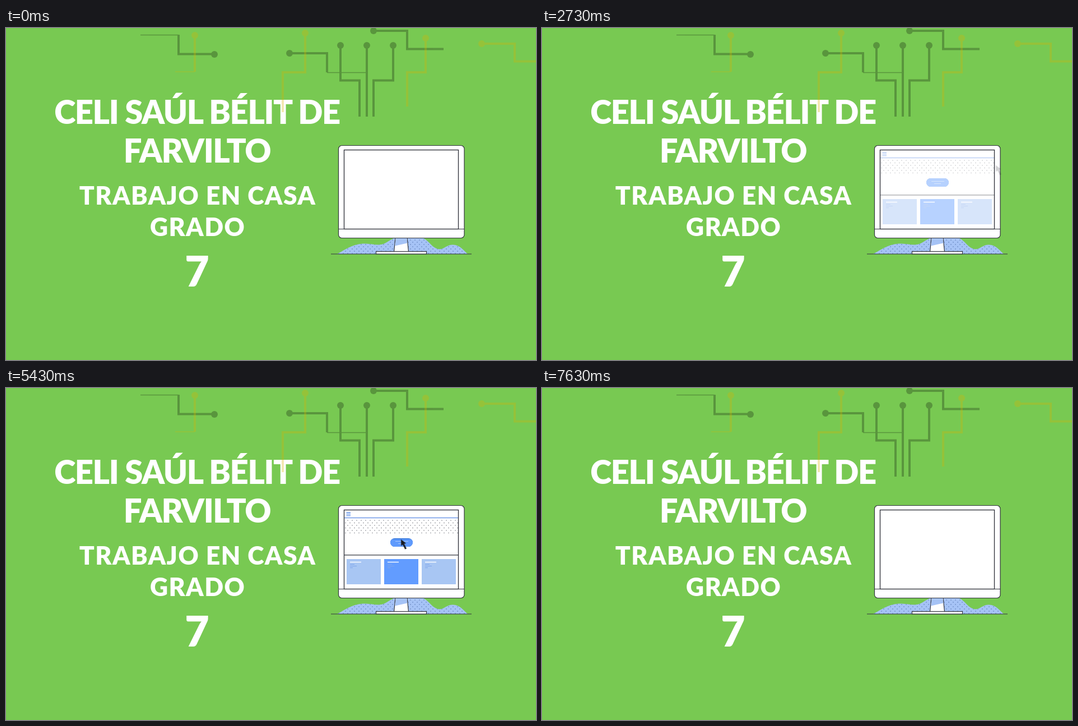
An HTML page without scripts that plays this animation: 946 by 592 pixels, repeating every 7660 ms.

```html
<!DOCTYPE html>
<html lang="es">
<head>
<meta charset="utf-8">
<title>Trabajo en casa</title>
<style>
  html, body { margin: 0; width: 100%; height: 100%; overflow: hidden; background: #78c952; }
  svg { display: block; width: 946px; height: 592px; }
  .title { fill: #fff; font-family: Lato, "Open Sans", sans-serif; font-weight: 900; text-anchor: middle; }
  .big { font-size: 58px; letter-spacing: -1.4px; }
  .mid { font-size: 44.5px; letter-spacing: 1.4px; }
  .num { font-size: 75px; }

  .wire { fill: none; stroke-width: 4; }
  .wire .thin { stroke-width: 1.6; }
  .dark { stroke: #000; opacity: .25; }
  .gold { stroke: #d8b400; opacity: .3; }
  .dark .dot { fill: #000; stroke: none; }
  .gold .dot { fill: #d8b400; stroke: none; }
  .ink { fill: #fff; stroke: #33363f; stroke-width: 1.2; }

  /* the page plays twice per loop */
  .page, .slide, .fill, .cursor, .turn { animation: 3.83s linear infinite; }
  .page { animation-name: page; }
  .slide { animation-name: slide; }
  .fill { animation-name: fill; }
  .cursor { animation-name: cursor, cursor-fade; }
  .turn { animation-name: turn; }

  @keyframes page {
    0%, .8% { opacity: 0; }
    10.4%, 61.4% { opacity: 1; }
    79.6%, 100% { opacity: 0; }
  }
  @keyframes slide {
    0%, .8% { transform: translateY(40px); animation-timing-function: cubic-bezier(.5, 1, .89, 1); }
    20.9%, 100% { transform: none; }
  }
  @keyframes fill {
    0%, 30% { transform: translateY(16px); }
    43%, 100% { transform: none; }
  }
  @keyframes cursor {
    0%, 7.8% { transform: translate(766px, 338px); animation-timing-function: cubic-bezier(.5, 1, .89, 1); }
    23.5% { transform: translate(705px, 270px); }
    63.4% { transform: translate(705px, 270px); animation-timing-function: cubic-bezier(.11, 0, .5, 0); }
    72.3%, 100% { transform: translate(838px, 238px); }
  }
  @keyframes cursor-fade {
    0%, 7.8% { opacity: 0; }
    11%, 67.4% { opacity: 1; }
    72.3%, 100% { opacity: 0; }
  }
  @keyframes turn {
    0%, 16.7% { transform: rotate(-24deg); }
    21.4%, 100% { transform: none; }
  }
</style>
</head>
<body>
<svg viewBox="0 0 946 592">
  <defs>
    <pattern id="dots" width="8" height="9" patternUnits="userSpaceOnUse">
      <circle cx="2" cy="2" r=".65" fill="#4a4d57"/>
      <circle cx="6" cy="6.5" r=".65" fill="#4a4d57"/>
    </pattern>
    <pattern id="hill-dots" width="8" height="8" patternUnits="userSpaceOnUse">
      <circle cx="2" cy="2" r=".7" fill="#44639f"/>
      <circle cx="6" cy="6" r=".7" fill="#44639f"/>
    </pattern>
    <path id="hills" d="M591 403C606 395 620 384 642 384.500C655 385 665 389 676 384C684 380 688 376 696 374H742C755 377 760 394 774 394.500C783 394 787 386 798 386.500C810 387 816 396 824 403Z"/>
    <clipPath id="screen"><rect x="603.500" y="217.500" width="204" height="140.500"/></clipPath>
    <clipPath id="pill"><rect x="686" y="268" width="40" height="15" rx="7.500"/></clipPath>
    <g id="lines" fill="none">
      <path d="M6 5.500H26" stroke="#fff" stroke-width="1.400"/>
      <path d="M6 9.500H14M6 12.500H18M6 15.500H11" stroke="#7fa6ea"/>
    </g>
  </defs>

  <rect width="946" height="592" fill="#78c952"/>

  <g class="title">
    <text class="big" x="341" y="171">CELI SAÚL BÉLIT DE</text>
    <text class="big" x="341" y="240">FARVILTO</text>
    <text class="mid" x="342" y="315">TRABAJO EN CASA</text>
    <text class="mid" x="342" y="371">GRADO</text>
    <text class="num" x="341" y="461">7</text>
  </g>

  <g class="wire dark">
    <path class="thin" d="M240 12.500H308"/>
    <path d="M308 12V46.500H372M506 45H573V79M597 31V93.500H631V158M644 31V158M691 31V93.500H656V158M656 5H716V37.500H781"/>
    <path class="thin" d="M573 79.500H644"/>
    <g class="dot">
      <circle cx="372" cy="47" r="6"/>
      <circle cx="506" cy="45" r="6"/>
      <circle cx="597" cy="31" r="6"/>
      <circle cx="644" cy="31" r="6"/>
      <circle cx="691" cy="31" r="6"/>
      <circle cx="656" cy="5" r="6"/>
    </g>
  </g>
  <g class="wire gold">
    <path d="M337 13V78M534 9V79H494V150M749 18V79H716V140M849 28H908V59.500H946"/>
    <path class="thin" d="M337 78H302"/>
    <g class="dot">
      <circle cx="337" cy="13" r="6"/>
      <circle cx="534" cy="9" r="6"/>
      <circle cx="749" cy="18" r="6"/>
      <circle cx="849" cy="28" r="6"/>
    </g>
  </g>

  <use href="#hills" fill="#a6c3f6"/>
  <use href="#hills" fill="url(#hill-dots)"/>
  <path d="M580 403H831" stroke="#33363f" stroke-width="1.200"/>
  <path class="ink" d="M695 374H716L718.500 399H692.500Z"/>
  <path d="M695.500 375H715.500L716.300 383.500L694.300 388.500Z" fill="#a6c3f6"/>
  <rect class="ink" x="660.500" y="398.500" width="90" height="4.500"/>
  <rect class="ink" x="593.500" y="209.500" width="224.500" height="165" rx="6"/>
  <path d="M593.500 358.500H818" stroke="#33363f" stroke-width="1.200"/>
  <rect class="ink" x="603.500" y="217.500" width="204" height="141"/>

  <g clip-path="url(#screen)">
    <g class="page">
      <g class="slide">
        <path d="M607.500 222H615M607.500 224.800H615M607.500 227.600H615" stroke="#5b8ee8" stroke-width="1.300"/>
        <path d="M604 231.500H807" stroke="#6f98e6" stroke-width="1.500"/>
        <rect x="605" y="233" width="202" height="26" fill="url(#dots)"/>
        <path d="M604 297.800H807" stroke="#33363f" stroke-width="1.200"/>
        <g clip-path="url(#pill)">
          <rect x="686" y="268" width="40" height="15" fill="#2f72d9"/>
          <rect class="fill" x="686" y="268" width="40" height="15" fill="#5f9afc"/>
        </g>
        <path d="M695 273.500H718M700 277.500H712" stroke="#a9c8fb"/>
        <rect x="608" y="305" width="61" height="45" fill="#a8c6f3"/>
        <rect x="675" y="305" width="61" height="45" fill="#629cff"/>
        <rect x="742" y="305" width="61" height="45" fill="#a8c6f3"/>
        <use href="#lines" x="608" y="305"/>
        <use href="#lines" x="675" y="305"/>
        <use href="#lines" x="742" y="305"/>
      </g>
    </g>
  </g>
  <rect x="603.500" y="217.500" width="204" height="141" fill="none" stroke="#33363f" stroke-width="1.200"/>

  <g class="cursor">
    <g class="turn">
      <path d="M0 0L5 10.500L1.500 9.500V19H-1.500V9.500L-5 10.500Z" transform="rotate(-27)" fill="#17191f"/>
    </g>
  </g>
</svg>
</body>
</html>
```
